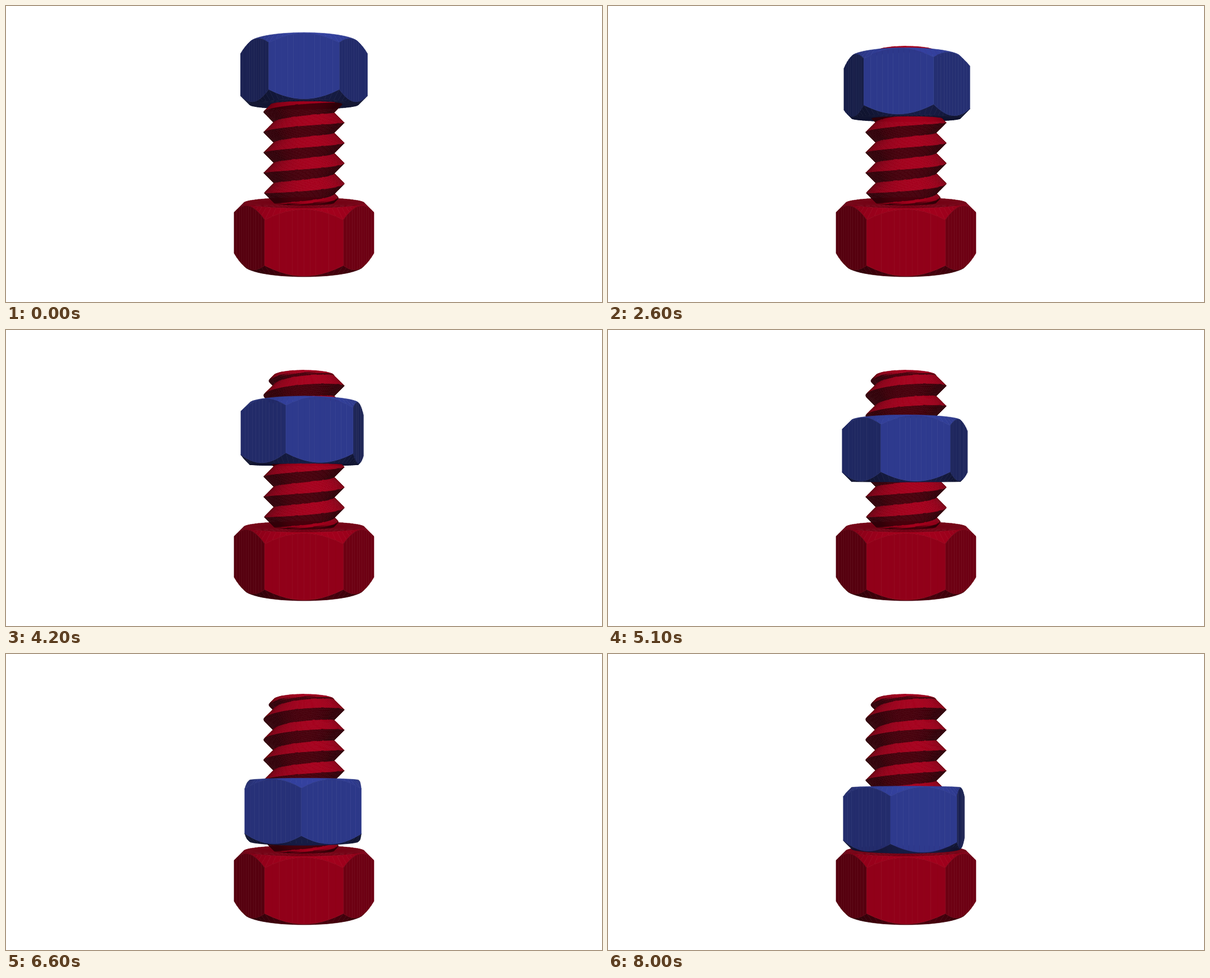
Animation of 1061 by 528 pixels, one loop 8100 ms. Source, as an HTML page with a canvas:

```html
<!DOCTYPE html>
<html lang="en">
<head>
<meta charset="utf-8">
<title>Nut and bolt</title>
<style>
html, body { margin: 0; width: 100%; height: 100%; overflow: hidden; background: #fff; }
canvas { display: block; }
</style>
</head>
<body>
<canvas id="stage" width="1061" height="528"></canvas>
<script>
const ctx = document.getElementById('stage').getContext('2d');
const LOOP = 8100, STEP = 100, RAD = Math.PI / 180;
const CX = 530.5, CY = 262, EYE = 980;          // projection centre and camera distance
const LIGHT = [13, 64, 93], AMBIENT = 48;
const RED = [1.03, 0, 0.18], BLUE = [0.325, 0.41, 1];
const PITCH = 36, ROOT = 53.5, TOP = 180, SEAT = -88.3;
const HEAD = { R: 124.5, y0: -197, y1: SEAT };
const NUT = { R: 113, y0: 85.5, y1: 193.5 };
const SPIN = 36.55, LAST_TURN = 1722.5, DROP = 35.5;

const polar = (a, r, y) => [r * Math.sin(a), y, r * Math.cos(a)];
const sub = (p, q) => [p[0] - q[0], p[1] - q[1], p[2] - q[2]];
const dot = (p, q) => p[0] * q[0] + p[1] * q[1] + p[2] * q[2];
const cross = (p, q) => [
  p[1] * q[2] - p[2] * q[1],
  p[2] * q[0] - p[0] * q[2],
  p[0] * q[1] - p[1] * q[0]
];

// Returns a lit quad, or nothing if it is flat or faces away.
function makeQuad(a, b, c, d, tint) {
  const n = cross(sub(c, a), sub(d, b));
  const size = Math.hypot(...n);
  if (size < 1e-3 || dot(n, sub([0, 0, EYE], a)) <= 0) return;
  const level = AMBIENT + Math.max(0, dot(n, LIGHT) / size);
  return {
    points: [a, b, c, d],
    depth: a[2] + b[2] + c[2] + d[2],
    color: `rgb(${tint.map(v => Math.round(v * level))})`
  };
}

function paint(quads) {
  quads.sort((p, q) => p.depth - q.depth);
  ctx.lineWidth = 0.6;
  ctx.lineJoin = 'round';
  for (const { points, color } of quads) {
    ctx.beginPath();
    for (const [x, y, z] of points) {
      const s = EYE / (EYE - z);
      ctx.lineTo(CX + x * s, CY - y * s);
    }
    ctx.closePath();
    ctx.fillStyle = ctx.strokeStyle = color;
    ctx.fill();
    ctx.stroke();
  }
}

// Hexagonal prism whose corners are cut by 45 degree cones.
function drawHex({ R, y0, y1 }, tint, turn = 0, shift = 0) {
  const rim = R * 0.855, apothem = R * Math.cos(30 * RAD);
  const lo = y0 - shift, hi = y1 - shift;
  const outline = deg => {
    const r = apothem / Math.cos(((deg + 390) % 60 - 30) * RAD);
    const cut = r - rim;
    return [[0, lo], [rim, lo], [r, lo + cut], [r, hi - cut], [rim, hi], [0, hi]]
      .map(([radius, y]) => polar((deg - turn) * RAD, radius, y));
  };
  const quads = [];
  for (let deg = -30; deg < 330; deg += 5) {
    const p = outline(deg), q = outline(deg + 5);
    for (let i = 0; i < 5; i++) {
      const quad = makeQuad(p[i], q[i], q[i + 1], p[i + 1], tint);
      if (quad) quads.push(quad);
    }
  }
  paint(quads);
}

// Part of the threaded shaft between two heights.
function drawThread(lo, hi) {
  if (hi <= lo) return;
  const PARTS = 16, SLICES = 56, SPAN = 1.9;
  const point = (i, k) => {
    const a = (2 * i / SLICES - 1) * SPAN;
    const lead = a / (2 * Math.PI) - 0.25;
    const y = Math.min(hi, Math.max(lo, PITCH * (k / PARTS + lead)));
    const w = y / PITCH - lead;
    const ridge = PITCH * (0.5 - Math.abs(w - Math.floor(w) - 0.5));
    return polar(a, ROOT + Math.min(ridge, TOP - y, y - SEAT), y);
  };
  const first = Math.floor((lo / PITCH - 0.3) * PARTS);
  const last = Math.ceil((hi / PITCH + 0.8) * PARTS);
  const quads = [];
  for (let i = 0; i < SLICES; i++) {
    let a = point(i, first), b = point(i + 1, first);
    for (let k = first + 1; k <= last; k++) {
      const d = point(i, k), c = point(i + 1, k);
      const quad = makeQuad(a, b, c, d, RED);
      if (quad) quads.push(quad);
      a = d;
      b = c;
    }
  }
  paint(quads);
}

function draw(ms) {
  const t = ms / 1000;
  const turn = Math.min(SPIN * t * t, LAST_TURN);
  const shift = turn / 360 * DROP;
  const below = NUT.y0 - shift, above = NUT.y1 - shift;
  const lower = () => drawThread(SEAT, below);
  const upper = () => drawThread(above, TOP);

  ctx.fillStyle = '#fff';
  ctx.fillRect(0, 0, 1061, 528);
  drawHex(HEAD, RED);
  // Eye level is y = 0, which decides what covers what.
  if (below <= 0) lower();
  if (above > 0) upper();
  drawHex(NUT, BLUE, turn, shift);
  if (above <= 0) upper();
  if (below > 0) lower();
}

let shown = -1;
function tick() {
  const step = Math.floor(performance.now() % LOOP / STEP);
  if (step !== shown) draw((shown = step) * STEP);
  requestAnimationFrame(tick);
}
tick();
</script>
</body>
</html>
```
